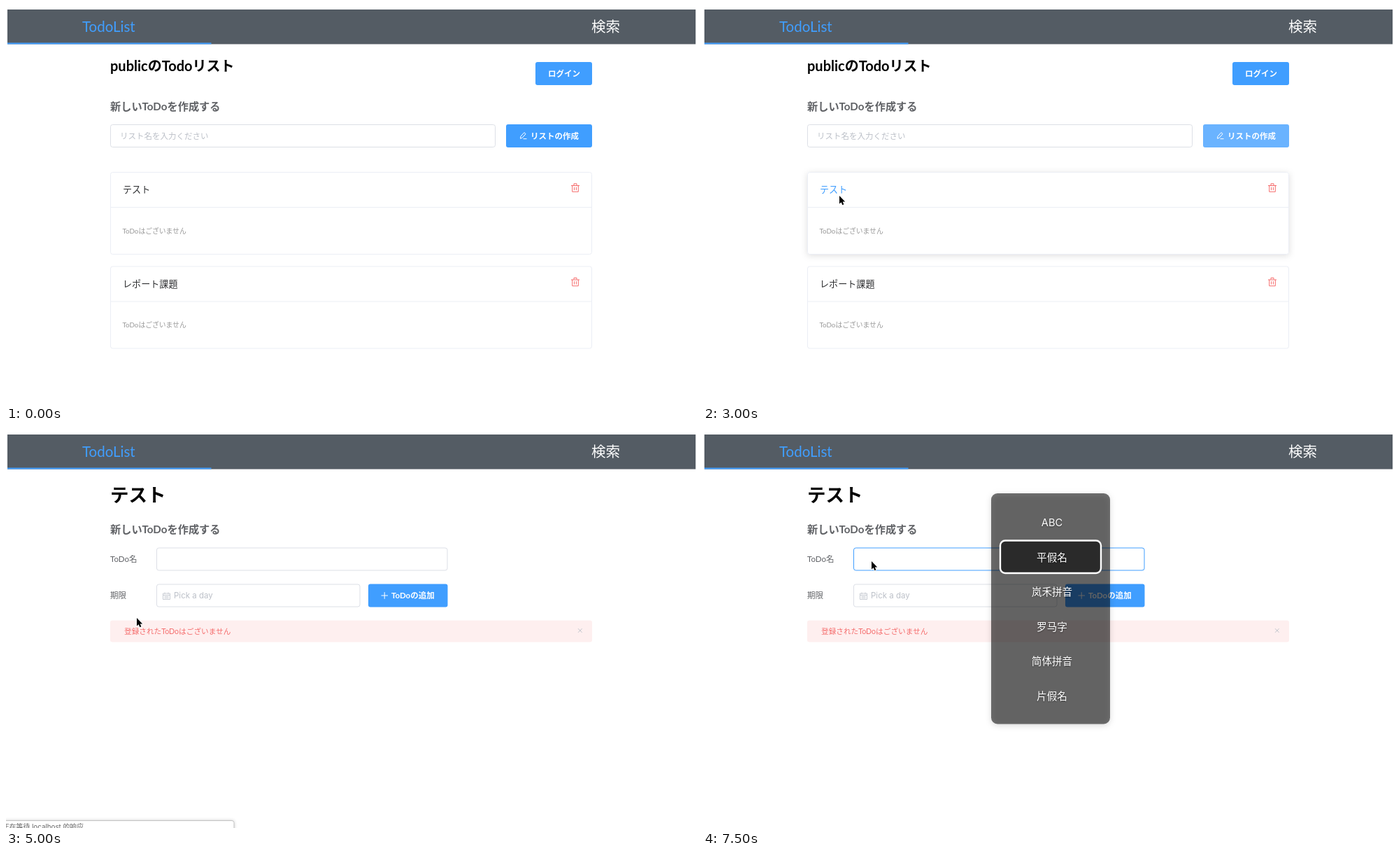
Write an HTML page that moves like this. It is 988 by 567 pixels and loops after 8000 ms.

```html
<!DOCTYPE html>
<html lang="ja">
<head>
<meta charset="utf-8">
<title>Todo</title>
<style>
  html, body { margin: 0; width: 100%; height: 100%; overflow: hidden; background: #fff; }
  svg { display: block; width: 988px; height: 567px; font: 11.5px Lato, "Noto Sans CJK JP", sans-serif; }
  .zh { font-family: Inter, "Noto Sans CJK SC", sans-serif; }
  .bold { font-weight: 700; }
  .btn { fill: #409eff; }
  .box { fill: #fff; stroke: #dcdfe6; }
  .card { fill: #fff; stroke: #ebeef5; }
  .shadow { fill: #fff; filter: drop-shadow(0 2px 5px rgba(0, 0, 0, .13)); }
  .hint { fill: #bcc0c8; }
  .label { fill: #606266; }
  .line { fill: none; stroke-width: 1; }
  .popup text { fill: #fff; font-size: 14.6px; text-anchor: middle; text-shadow: 0 1px 2px rgba(0, 0, 0, .4); }
</style>
</head>
<body>
<svg viewBox="0 0 988 567">
  <defs>
    <g id="trash" class="line" stroke="#f56c6c">
      <path d="M808 256.5h12M812 256v-2.2h4v2.2M809.7 256.5v8.8h8.6v-8.8M812.6 258.7v4.4M815.4 258.7v4.4"/>
    </g>
  </defs>

  <rect x="2" y="5" width="984" height="49.5" fill="#545c64"/>
  <rect x="2" y="52.5" width="291.5" height="2" class="btn"/>
  <text x="109" y="36.5" font-size="20.5" fill="#409eff">TodoList</text>
  <text x="837" y="36.5" font-size="20.5" fill="#fff">検索</text>

  <g id="listPage">
    <text x="149" y="93" font-size="20" class="bold">publicのTodoリスト</text>
    <rect x="757" y="80" width="81" height="33" rx="3" class="btn"/>
    <text x="775" y="101" fill="#fff" class="bold">ログイン</text>
    <text x="149" y="148.5" font-size="15.2" class="bold label">新しいToDoを作成する</text>
    <rect x="149.5" y="169.5" width="550" height="32" rx="3" class="box"/>
    <text x="163" y="189.5" class="hint">リスト名を入力ください</text>
    <rect id="create" x="715" y="169" width="123" height="33" rx="3" class="btn"/>
    <path d="M735.5 189.3l.4-3 5-5.6 2.2 2-5 5.6zM739.5 189.7h5" class="line" stroke="#fff"/>
    <text x="750" y="189.5" fill="#fff" class="bold">リストの作成</text>
    <g id="cards"></g>
  </g>

  <g id="todoPage">
    <text x="149" y="101" font-size="26.5" class="bold">テスト</text>
    <text x="149" y="145.5" font-size="15.2" class="bold label">新しいToDoを作成する</text>
    <text x="149" y="186.5" class="label">ToDo名</text>
    <rect id="nameBox" x="215.5" y="167" width="415.5" height="32" rx="3" class="box"/>
    <rect id="caret" x="228" y="175" width="1" height="15"/>
    <text x="149" y="238.5" class="label">期限</text>
    <rect x="215.5" y="219" width="290.5" height="32" rx="3" class="box"/>
    <path d="M224.5 232h10v8.5h-10zM224.5 234.5h10M227 230.5v2.5M232 230.5v2.5M226.5 236.5h6M226.5 238.5h6" class="line" stroke="#c8ccd3"/>
    <text x="240" y="239" class="hint zh">Pick a day</text>
    <rect x="518" y="218.5" width="113.5" height="33" rx="3" class="btn"/>
    <path d="M536.5 235h9.5M541.2 230.2v9.6" class="line" stroke="#fff"/>
    <text x="551" y="239" fill="#fff" class="bold">ToDoの追加</text>
    <rect x="149" y="270.5" width="689" height="31" rx="3" fill="#feefef"/>
    <text x="169" y="290" font-size="10.65" fill="#f56c6c">登録されたToDoはございません</text>
    <path d="M818 282.2l5.6 5.6m0-5.6l-5.6 5.6" class="line" stroke="#c0c4cc"/>
    <g id="status" class="zh">
      <rect x="-5" y="556.5" width="331" height="20" rx="3" fill="#fff" stroke="#c4c4c4" style="filter: drop-shadow(0 0 2px #0003)"/>
      <text x="-5" y="569" font-size="9.8" fill="#666">正在等待 localhost 的响应...</text>
    </g>
  </g>

  <path id="cursor" d="M0 0V11.6L2.6 9.2 4.4 13.2 6.4 12.3 4.7 8.5H8.2Z" stroke="#fff" stroke-width="1.4" paint-order="stroke"/>

  <g id="popup" class="popup zh">
    <rect x="412" y="89" width="170" height="329.5" rx="9" fill="#000" fill-opacity=".55" style="filter: drop-shadow(0 2px 4px #0004)"/>
    <rect x="425" y="156.5" width="144" height="46.5" rx="7" fill="#2a2a2a" stroke="#fff" stroke-width="2.4"/>
  </g>
</svg>
<script>
const $ = id => document.getElementById(id);
const STEP = 250, LOOP = 8000;

const card = (id, y, title) => `
  <rect id="shadow${id}" x="149" y="${y}" width="689" height="117.5" rx="3" class="shadow"/>
  <rect x="149.5" y="${y + .5}" width="688" height="117" rx="3" class="card"/>
  <path d="M150 ${y + 50.5}h687" stroke="#ebeef5"/>
  <text id="title${id}" x="167" y="${y + 30}" font-size="13.1" fill="#303133">${title}</text>
  <use href="#trash" y="${y - 237}"/>
  <text x="166.5" y="${y + 87.5}" font-size="9.8" fill="#999">ToDoはございません</text>`;
$('cards').innerHTML = card(1, 237, 'テスト') + card(2, 371.5, 'レポート課題');

$('popup').innerHTML += ['ABC', '平假名', '岚禾拼音', '罗马字', '简体拼音', '片假名']
  .map((name, i) => `<text x="499" y="${136 + i * 49.5}">${name}</text>`).join('');

// Keys are [time, ...values], joined by straight segments.
const pointer = [[250, 620, 51], [500, 530, 115], [750, 400, 195], [1000, 260, 250], [1250, 190, 264],
  [2250, 206, 260], [3000, 195, 271], [3250, 195, 300], [3500, 197, 370], [3750, 198, 385],
  [4000, 197, 325], [4250, 191, 285], [4500, 187, 267], [5000, 187, 267], [5250, 195, 255],
  [5750, 238, 192], [6000, 241, 186]];
const hover1 = [[2500, 0], [3000, 1], [3250, 1], [3750, 0], [4000, .1], [4250, .8], [4500, 1]];
const hover2 = [[3250, 0], [3750, 1], [4000, .3], [4250, 0]];

function sample(keys, t) {
  const next = keys.findIndex(key => key[0] > t);
  if (next < 1) return keys.at(next).slice(1);
  const a = keys[next - 1], b = keys[next], k = (t - a[0]) / (b[0] - a[0]);
  return a.slice(1).map((v, i) => v + (b[i + 1] - v) * k);
}

const show = (id, on) => $(id).style.display = on ? '' : 'none';

function draw(now) {
  const t = Math.floor(now % LOOP / STEP) * STEP;
  const [x, y] = sample(pointer, t);
  const focused = t >= 6000;

  show('listPage', t < 5000);
  show('todoPage', t >= 5000);
  show('cursor', t >= 250);
  $('cursor').setAttribute('transform', `translate(${x} ${y})`);

  $('create').style.fill = t >= 2500 ? '#6ab3ff' : '#409eff';
  $('title1').style.fill = t >= 2750 && y < 280 ? '#409eff' : '#303133';
  $('shadow1').style.opacity = sample(hover1, t);
  $('shadow2').style.opacity = sample(hover2, t);

  $('nameBox').style.stroke = focused ? '#409eff' : '#dcdfe6';
  show('caret', focused && t % 1000 < 500);
  show('status', t < 5500);
  show('popup', t >= 7500);
  requestAnimationFrame(() => draw(performance.now()));
}
draw(0);
</script>
</body>
</html>
```
